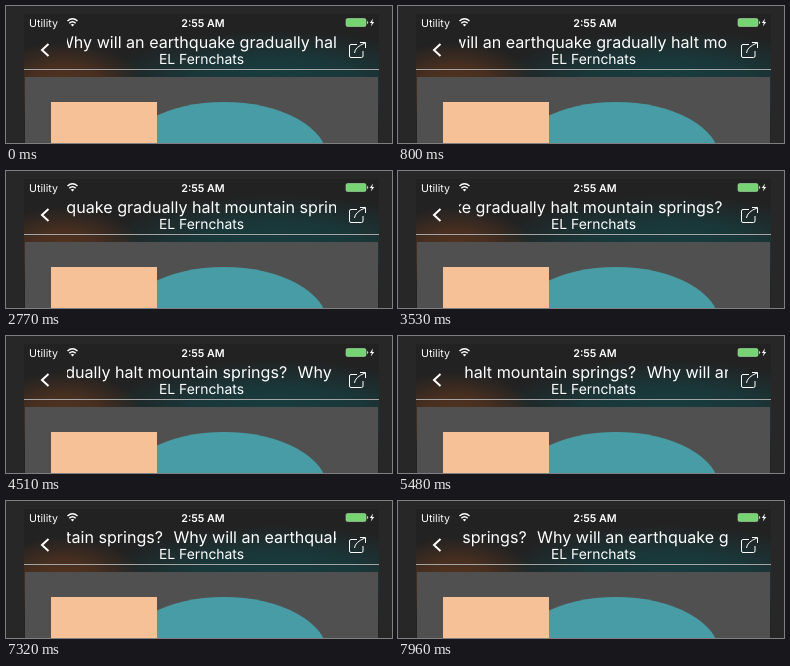
Recreate the animation shown at these times as an HTML page. Size 386 by 137 pixels, loop 8000 ms.

```html
<!DOCTYPE html>
<html lang="en">
<head>
<meta charset="utf-8">
<title>Podcast player header</title>
<style>
  html, body { margin: 0; width: 100%; height: 100%; overflow: hidden; background: #272727; }
  svg { display: block; width: 100%; height: 100%; }
  text { fill: #fff; font-family: Inter, sans-serif; text-rendering: geometricPrecision; white-space: pre; }
  .status { font-size: 10.7px; }
  .clock { font-weight: 600; text-anchor: middle; }
  .title { font-size: 16.1px; }
  .show { font-size: 13.9px; text-anchor: middle; }
  .line { fill: none; stroke: #fff; }
</style>
</head>
<body>
<svg viewBox="0 0 386 137">
  <defs>
    <radialGradient id="warm">
      <stop offset="0" stop-color="#54331f"/>
      <stop offset=".45" stop-color="#54331f" stop-opacity=".75"/>
      <stop offset="1" stop-color="#54331f" stop-opacity="0"/>
    </radialGradient>
    <radialGradient id="cool">
      <stop offset="0" stop-color="#173e41"/>
      <stop offset=".5" stop-color="#173e41" stop-opacity=".75"/>
      <stop offset="1" stop-color="#173e41" stop-opacity="0"/>
    </radialGradient>
    <clipPath id="screen"><rect x="18" y="8" width="355" height="129"/></clipPath>
    <clipPath id="titleBox"><rect x="61" y="26" width="269" height="22"/></clipPath>
  </defs>

  <rect width="386" height="137" fill="#272727"/>
  <g clip-path="url(#screen)">
    <rect x="18" y="8" width="355" height="129" fill="#222"/>
    <ellipse cx="270" cy="78" rx="175" ry="54" fill="url(#cool)"/>
    <ellipse cx="58" cy="78" rx="78" ry="42" fill="url(#warm)"/>
    <rect x="18" y="63" width="355" height="1" fill="#a5a5a5"/>
    <rect x="19" y="71" width="353" height="66" fill="#505050"/>
    <ellipse cx="218" cy="152" rx="103" ry="56" fill="#489ca5"/>
    <rect x="45" y="96" width="106" height="106" fill="#f6c197"/>
  </g>

  <!-- Status bar -->
  <text class="status" x="23" y="21">Utility</text>
  <g class="line" stroke-width="1.5">
    <path d="M61.5 15 Q66.5 10.6 71.5 15"/>
    <path d="M63.3 17.2 Q66.5 14.4 69.7 17.2"/>
  </g>
  <path d="M64.7 18.6 Q66.5 17.2 68.3 18.6 L66.5 20.6Z" fill="#fff"/>
  <text class="status clock" x="197" y="21">2:55 AM</text>
  <rect x="340" y="12.5" width="20" height="8" rx="1.6" fill="#76d572" stroke="#a6d9a4" stroke-width=".6"/>
  <path d="M361 15v3q1.2-.3 1.2-1.5t-1.2-1.5z" fill="#ccc"/>
  <path d="M367 12.5l-3.2 4.5h2l-1 3.6 3.4-4.7h-2z" fill="#fff"/>

  <!-- Navigation bar -->
  <path class="line" stroke-width="2" d="M42.5 38l-6.5 6 6.5 6"/>
  <g class="line" stroke-width="1">
    <path d="M351 38.5h-6q-1.5 0-1.5 1.5v10q0 1.5 1.5 1.5h10.5q1.5 0 1.5-1.5v-5"/>
    <path d="M348.5 47q.5-6 10.5-10M354 36.5h5.5v5.5"/>
  </g>
  <g clip-path="url(#titleBox)">
    <g id="marquee">
      <text class="title" y="41.5">Why will an earthquake gradually halt mountain springs?</text>
      <text class="title" x="439" y="41.5">Why will an earthquake gradually halt mountain springs?</text>
    </g>
  </g>
  <text class="show" x="195.5" y="58">EL Fernchats</text>
</svg>
<script>
  const LOOP = 8000;
  const START_X = 52;
  const SPEED = 0.0442; // px per ms
  const marquee = document.getElementById("marquee");

  function draw() {
    const time = performance.now() % LOOP;
    marquee.setAttribute("transform", `translate(${START_X - SPEED * time} 0)`);
    requestAnimationFrame(draw);
  }
  draw();
</script>
</body>
</html>
```
